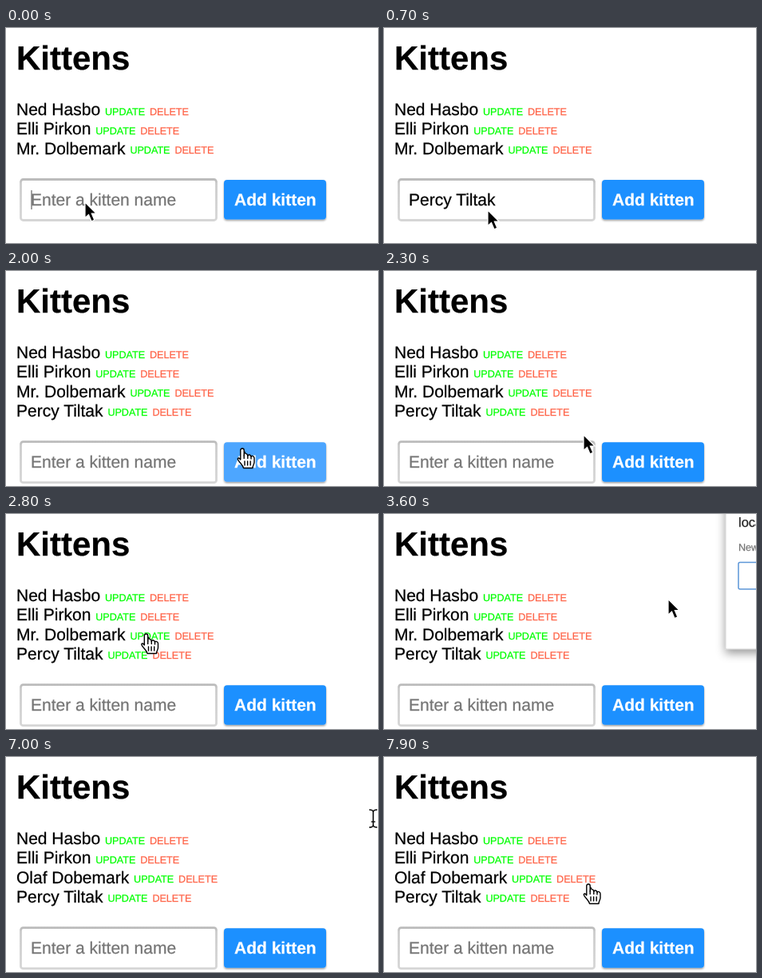
Write an HTML page that moves like this. It is 466x269 px and loops after 8 s.

```html
<!DOCTYPE html>
<html lang="en">
<head>
<meta charset="utf-8">
<title>Kittens</title>
<style>
  html, body { margin: 0; width: 100%; height: 100%; overflow: hidden; background: #fff; }
  svg { display: block; width: 100%; height: 100%; }
  text {
    font: 21px "Liberation Sans", Arial, sans-serif; text-rendering: geometricPrecision;
    color: #000; fill: currentColor; stroke: currentColor; stroke-width: .25;
  }
  tspan { fill: currentColor; stroke: currentColor; }
  .title { font-size: 42px; font-weight: bold; }
  .update, .delete { font-size: 12.6px; }
  .update { color: #0f0; }
  .delete { color: tomato; }
  .button { font-weight: bold; color: #fff; }
  .host { font-size: 16.5px; color: #222; }
  .label { font-size: 12.6px; color: #757575; }
  .answer { font-size: 13px; color: #333; }
</style>
</head>
<body>
<svg viewBox="0 0 466 269">
  <defs>
    <linearGradient id="inset" x2="0" y2="1">
      <stop stop-color="#bbb"/>
      <stop offset=".1" stop-color="#ccc"/>
      <stop offset="1" stop-color="#d6d6d6"/>
    </linearGradient>
    <filter id="lift" x="-10%" y="-10%" width="120%" height="130%">
      <feDropShadow dx="0" dy="1.5" stdDeviation="1.2" flood-opacity=".4"/>
    </filter>
    <filter id="float" x="-30%" y="-20%" width="160%" height="150%">
      <feDropShadow dx="0" dy="5" stdDeviation="6" flood-opacity=".4"/>
    </filter>
  </defs>

  <text class="title" x="13" y="52.3">Kittens</text>
  <g id="rows"></g>

  <g id="form">
    <rect id="field" x="18.5" y="189.5" width="245" height="51" rx="3" stroke="url(#inset)" stroke-width="2.8"/>
    <text id="entry" x="31" y="222"></text>
    <path id="caret" d="M32 203V227" stroke="#444"/>
    <rect id="button" x="273" y="190" width="128" height="49.5" rx="4" filter="url(#lift)"/>
    <text class="button" x="286" y="222">Add kitten</text>
  </g>

  <g id="dialog">
    <rect x="428" y="-20" width="300" height="189" fill="#fff" stroke="#c4c4c4" stroke-width=".7" filter="url(#float)"/>
    <text class="host" x="444" y="16">localhost says:</text>
    <text class="label" x="444" y="46">New name</text>
    <rect x="444" y="60.5" width="250" height="33.5" rx="2" fill="#fff" stroke="#5c96d8" stroke-width="1.5"/>
    <text class="answer" id="answer" x="452" y="81"></text>
    <path id="answerCaret" d="M453 68V84" stroke="#333"/>
  </g>

  <g id="cursor">
    <path id="arrow" d="M0 0V19.5L4.5 15.4 8 23.8 11.8 22.2 8.3 14H14Z" stroke="#fff" stroke-width="1.2"/>
    <g id="hand" stroke="#000" stroke-width="1.4" stroke-linejoin="round" stroke-linecap="round">
      <path fill="#fff" d="M-2.2 14V2.2C-2.2-.8 2.2-.8 2.2 2.2V9C3-.0 3 6.6 4.6 6.6 6.4 6.6 6.6 8 6.8 9.4 7.2 7.2 10.8 7.6 11 10.4 11.8 8.6 15 9.4 15 12V17C15 20 13 21 13 24.5H1.5C1 21-2.2 19-5 14.8-6.8 12-4.4 10.6-2.2 14Z"/>
      <path fill="none" d="M2.2 9V12.5M6.8 9.4V12.5M11 10.4V13M3 16V21M6.6 16V21M10.2 16V21"/>
    </g>
    <g id="beam" fill="none">
      <path d="M-5-11C-2-11 0-10 0-8 0-10 2-11 5-11M0-8V8M-5 11C-2 11 0 10 0 8 0 10 2 11 5 11M-2.5 4H2.5" stroke="#fff" stroke-width="3"/>
      <path d="M-5-11C-2-11 0-10 0-8 0-10 2-11 5-11M0-8V8M-5 11C-2 11 0 10 0 8 0 10 2 11 5 11M-2.5 4H2.5" stroke="#111" stroke-width="1.6"/>
    </g>
  </g>
</svg>

<script>
const LOOP = 8000, STEP = 100, LINE = 24.15;
const NEW_KITTEN = "Percy Tiltak", RENAMED = "Olaf Dobemark";
const $ = id => document.getElementById(id);
const clamp = v => Math.max(0, Math.min(1, v));
const show = (id, on) => $(id).setAttribute("visibility", on ? "visible" : "hidden");

// time, x, y of the pointer's hot spot
const path = [
  [0, 99, 218], [600, 99, 218], [700, 130, 228], [850, 215, 237], [1000, 300, 227], [1100, 327, 218],
  [1600, 327, 218], [2000, 296, 222], [2300, 250, 205], [2700, 175.5, 150],
  [3100, 175.5, 150], [3200, 188, 147], [3500, 310, 120], [3800, 448, 80], [3900, 460, 77],
  [7400, 460, 77], [7500, 445, 83], [7700, 335, 129], [7900, 256, 159], [LOOP, 256, 159]
];
const shapes = [
  [0, "arrow"], [1000, "hand"], [2200, "arrow"], [2600, "hand"],
  [2900, "arrow"], [3800, "beam"], [7500, "arrow"], [7900, "hand"]
];

function pointerAt(t) {
  const i = path.findIndex(p => p[0] > t);
  const [t0, x0, y0] = path[i - 1], [t1, x1, y1] = path[i];
  const k = (t - t0) / (t1 - t0);
  return [x0 + (x1 - x0) * k, y0 + (y1 - y0) * k];
}

// Characters typed so far when typing fills the given number of steps
const typed = (text, t, start, steps) =>
  text.slice(0, Math.ceil(text.length * clamp(((t - start) / STEP + 1) / steps)));

let listed = "";
function drawRows(names) {
  if (names.join() === listed) return;
  listed = names.join();
  $("rows").innerHTML = names.map((name, i) =>
    `<text x="13" y="${109.2 + LINE * i}">${name} <tspan class="update" dy="-.4">UPDATE</tspan> <tspan class="delete">DELETE</tspan></text>`
  ).join("");
}

function draw(now) {
  const t = Math.floor(now % LOOP / STEP) * STEP;
  const added = t >= 1400, pressed = t >= 1300 && !added;

  const names = ["Ned Hasbo", "Elli Pirkon", t < 6900 ? "Mr. Dolbemark" : RENAMED];
  if (added) names.push(NEW_KITTEN);
  drawRows(names);

  const entry = added ? "" : typed(NEW_KITTEN, t, 200, 3);
  $("entry").textContent = entry || "Enter a kitten name";
  $("entry").style.color = entry ? "#000" : "#757575";
  $("field").setAttribute("fill", pressed ? "#f2f2f2" : "#fff");
  $("button").setAttribute("fill", t >= 1000 && t < 2200 ? "#4da6ff" : "dodgerblue");
  $("form").setAttribute("transform", `translate(0 ${added ? LINE : 0})`);
  show("caret", t < 200);

  $("dialog").setAttribute("opacity", clamp((t - 2800) / 300) * clamp((6900 - t) / 300));
  $("answer").textContent = typed(RENAMED, t, 4400, 4);
  show("answerCaret", t >= 4100 && t < 4400);

  const shape = shapes.findLast(s => s[0] <= t)[1];
  for (const id of ["arrow", "hand", "beam"]) show(id, id === shape);
  $("cursor").setAttribute("transform", `translate(${pointerAt(t)})`);
}

function tick() {
  draw(performance.now());
  requestAnimationFrame(tick);
}
tick();
</script>
</body>
</html>
```
